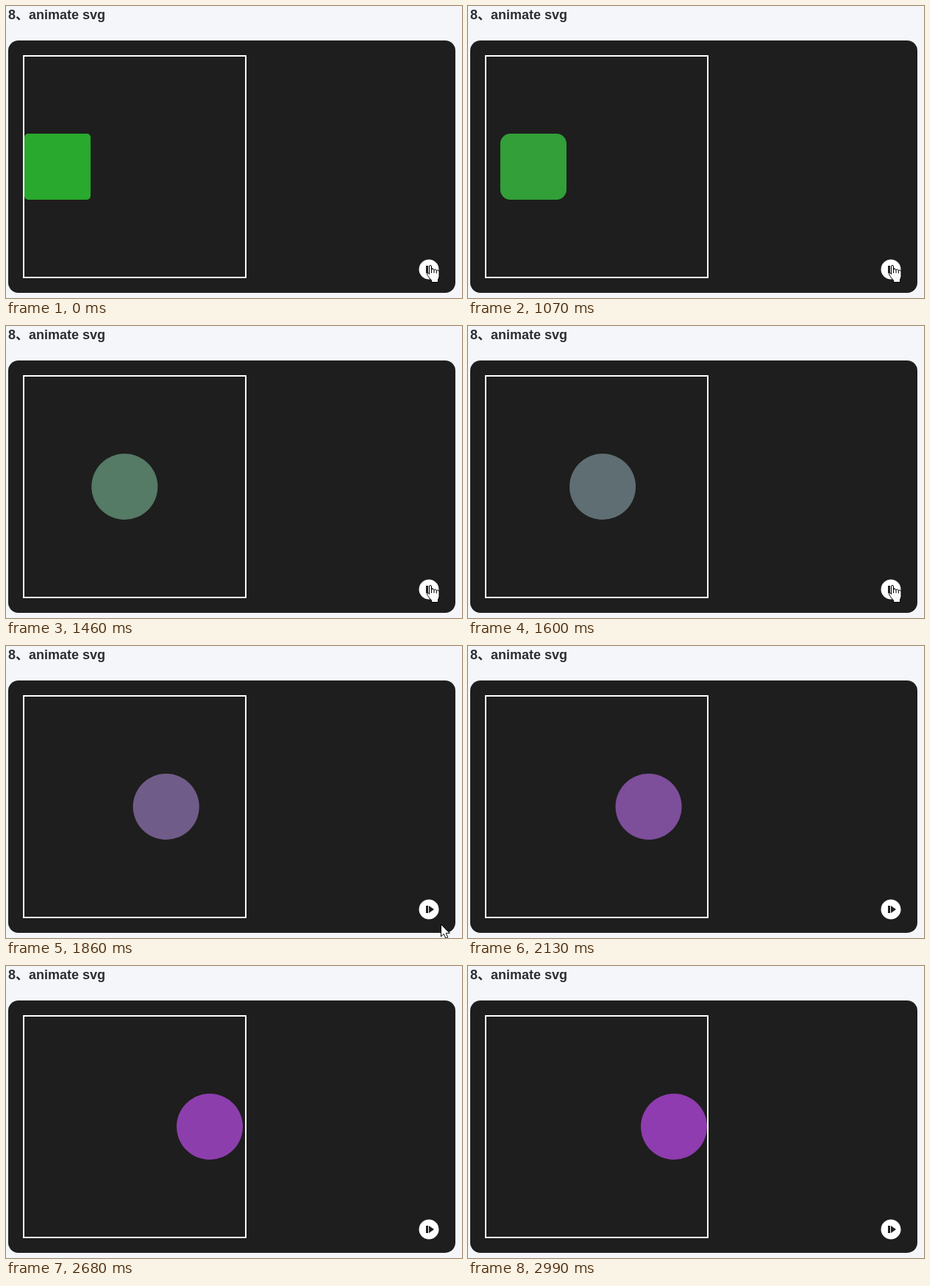
These frames come from a looping animation (620x398 px, 3.42 s). An HTML page:

```html
<!DOCTYPE html>
<html lang="en">
<head>
<meta charset="utf-8">
<title>animate svg</title>
<style>
  html, body { margin: 0; width: 100%; height: 100%; overflow: hidden; background: #f5f6fa; }
  svg { display: block; }
  text { font: bold 18px "Liberation Sans", "Noto Sans CJK SC", "Noto Sans CJK", sans-serif; fill: #2c2c32; }
  .cursor { fill: #fff; stroke: #000; stroke-width: 1; stroke-linejoin: round; }
</style>
</head>
<body>
<svg width="620" height="398" viewBox="0 0 620 398">
  <text x="3" y="18">8、animate svg</text>
  <rect x="3" y="47" width="608" height="344" rx="14" fill="#1e1e1e"/>
  <rect x="24" y="68" width="302" height="302" fill="none" stroke="#fff" stroke-width="2"/>
  <rect id="shape" y="174" width="90" height="90"/>

  <circle cx="575" cy="359" r="13.5" fill="#fff"/>
  <path d="M571 354h3v10h-3zM575 354l7 5l-7 5z" fill="#1e1e1e"/>

  <g id="hand" class="cursor">
    <path d="M575.5 365.5V355Q575.5 353.5 577 353.5T578.5 355V359.5
      Q579 358.5 580.3 358.5T582 360Q582.5 359 583.7 359T585.4 361
      Q586 360 587.2 360T589 362V368.500Q588.500 371 587.500 373V376.500H578.500V374
      Q575.500 371 573.500 367.500Q571.500 364.500 573 363.800T575.500 365.500Z"/>
    <path d="M578.500 359V364M582 360V364M585.400 361V364.500" fill="none"/>
  </g>
  <path id="arrow" class="cursor" d="M0 0V16.500L3.800 13L6.400 18.800L9.200 17.600L6.700 11.900H11.700Z"/>
</svg>
<script>
  const LOOP = 3420, START = 981, DURATION = 1931;
  const TICKS = [0, 1070, 1200, 1340, 1460, 1600, 1740, 1860, 1980,
    2130, 2260, 2410, 2550, 2680, 2830, 2990];
  const GREEN = [41, 169, 45], PURPLE = [142, 60, 175];
  const ARROW_PATH = { 1740: [589, 372], 1860: [591.5, 379.5], 1980: [591, 387] };

  const [shape, hand, arrow] = ["shape", "hand", "arrow"].map(id => document.getElementById(id));
  const mix = (from, to, p) => from + (to - from) * p;
  const easeOutQuad = p => 1 - (1 - p) ** 2;
  const show = (element, visible) => element.setAttribute("visibility", visible ? "visible" : "hidden");

  function draw(time) {
    // The picture advances in discrete steps, not continuously.
    const tick = TICKS.findLast(t => t <= time);
    const p = easeOutQuad(Math.min(1, Math.max(0, (tick - START) / DURATION)));
    shape.setAttribute("x", mix(25, 235, p));
    shape.setAttribute("rx", Math.min(45, mix(5, 100, p)));
    shape.setAttribute("fill", `rgb(${GREEN.map((c, i) => Math.round(mix(c, PURPLE[i], p)))})`);

    const tip = ARROW_PATH[tick];
    show(hand, tick < 1740);
    show(arrow, tip);
    if (tip) arrow.setAttribute("transform", `translate(${tip})`);
  }

  const origin = performance.now();
  function frame() {
    draw((performance.now() - origin) % LOOP);
    requestAnimationFrame(frame);
  }
  frame();
</script>
</body>
</html>
```
